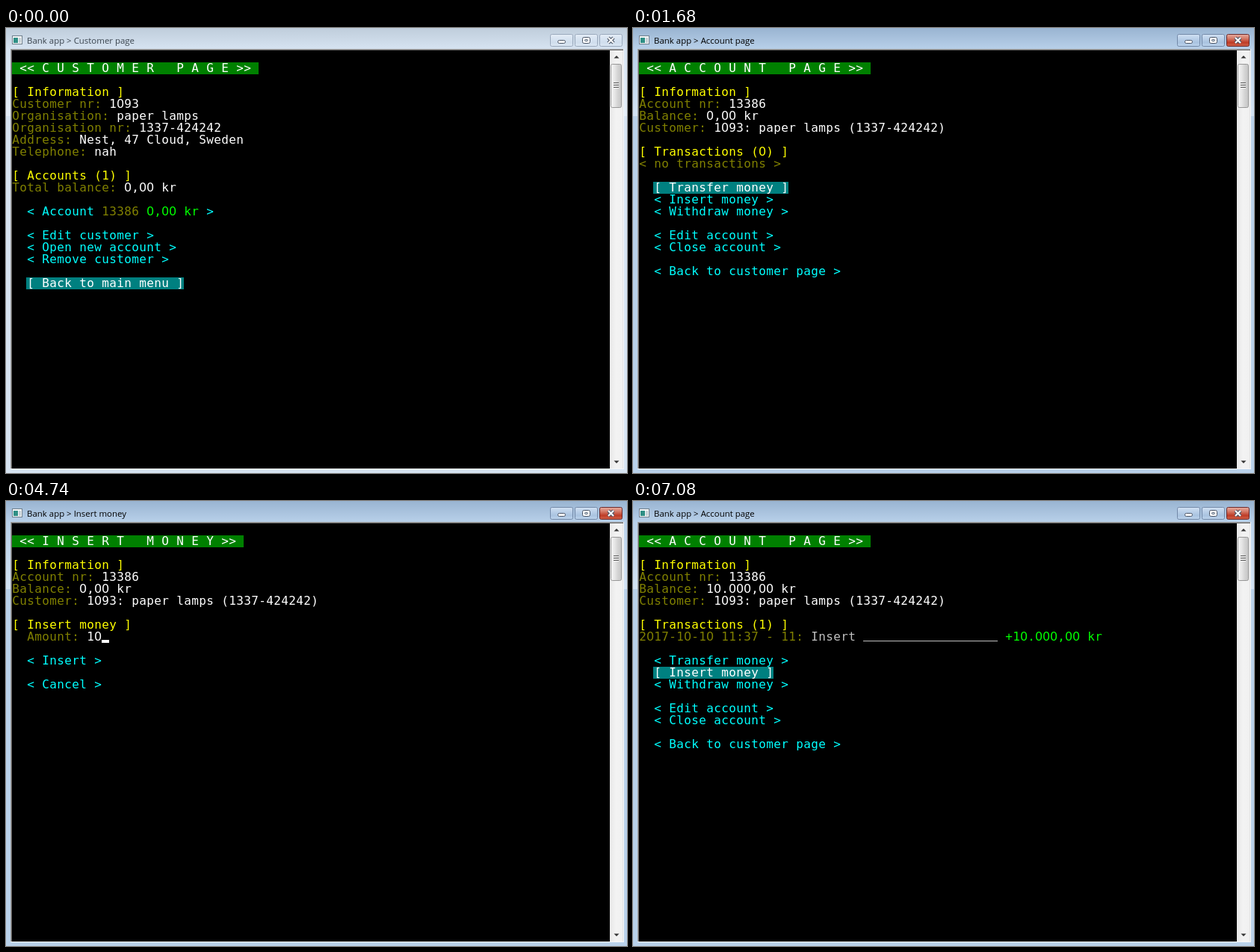
Animation, 831 px wide and 596 px high, one loop 8 s. Source, as an HTML page with a canvas:

```html
<!DOCTYPE html>
<html lang="en">
<head>
<meta charset="utf-8">
<title>Bank app</title>
<style>
html, body { margin: 0; width: 100%; height: 100%; overflow: hidden; }
canvas { display: block; }
</style>
</head>
<body>
<canvas id="stage" width="831" height="596"></canvas>
<script>
const ctx = document.getElementById('stage').getContext('2d');
const LOOP = 8000, CELL = 10, LINE = 16, LEFT = 8, TOP = 30;
const MONO = '16px "DejaVu Sans Mono", monospace';
const SANS = '16px "DejaVu Sans", sans-serif';
const COLORS = {
  w: '#fff', o: '#808000', y: '#ff0', c: '#0ff', l: '#0f0', s: '#c0c0c0', k: '#000'
};
const CUSTOMER = 'paper lamps';

function rect(x, y, w, h, fill) {
  ctx.fillStyle = fill;
  ctx.fillRect(x, y, w, h);
}

function gradient(x0, y0, x1, y1, ...colors) {
  const g = ctx.createLinearGradient(x0, y0, x1, y1);
  colors.forEach((c, i) => g.addColorStop(i / (colors.length - 1), c));
  return g;
}

function roundBox(x, y, w, h, fill, stroke) {
  ctx.beginPath();
  ctx.roundRect(x + .5, y + .5, w - 1, h - 1, 2);
  ctx.fillStyle = fill;
  ctx.fill();
  ctx.strokeStyle = stroke;
  ctx.lineWidth = 1;
  ctx.stroke();
}

// Console text: "^" and a colour key start each run.
function put(row, col, text) {
  const y = TOP + row * LINE + 13;
  ctx.textAlign = 'center';
  for (const run of text.split('^').slice(1)) {
    ctx.fillStyle = COLORS[run[0]];
    for (const ch of run.slice(1)) {
      const x = LEFT + col++ * CELL;
      if (ch === '_') { ctx.fillRect(x, y, CELL, 1); continue; }
      ctx.font = ch === '0' ? SANS : MONO; // plain zero, no dot
      ctx.fillText(ch, x + CELL / 2, y);
    }
  }
}

function heading(words) {
  const text = ' << ' + words.split('').join(' ') + ' >> ';
  rect(LEFT, TOP + LINE, text.length * CELL, LINE, '#008000');
  put(1, 0, '^w' + text);
}

function item(row, label, selected, plain = '^c' + label, marked = '^w' + label) {
  if (selected) rect(27, TOP + row * LINE, (label.length + 4) * CELL + 1, LINE, '#008080');
  put(row, 2, selected ? `^w[ ${marked}^w ]` : `^c< ${plain}^c >`);
}

function menu(items, selected) {
  for (const [row, label] of items) item(row, label, row === selected);
}

function customerPage(selected) {
  heading('CUSTOMER PAGE');
  put(3, 0, '^y[ Information ]');
  put(4, 0, '^oCustomer nr: ^w1093');
  put(5, 0, '^oOrganisation: ^w' + CUSTOMER);
  put(6, 0, '^oOrganisation nr: ^w1337-424242');
  put(7, 0, '^oAddress: ^wNest, 47 Cloud, Sweden');
  put(8, 0, '^oTelephone: ^wnah');
  put(10, 0, '^y[ Accounts (1) ]');
  put(11, 0, '^oTotal balance: ^w0,00 kr');
  item(13, 'Account 13386 0,00 kr', selected === 13,
    '^cAccount ^o13386 ^l0,00 kr', '^wAccount ^k13386 ^w0,00 kr');
  menu([[15, 'Edit customer'], [16, 'Open new account'],
    [17, 'Remove customer'], [19, 'Back to main menu']], selected);
}

function accountInfo(balance) {
  put(3, 0, '^y[ Information ]');
  put(4, 0, '^oAccount nr: ^w13386');
  put(5, 0, `^oBalance: ^w${balance} kr`);
  put(6, 0, `^oCustomer: ^w1093: ${CUSTOMER} (1337-424242)`);
}

function accountPage(selected, paid) {
  heading('ACCOUNT PAGE');
  accountInfo(paid ? '10.000,00' : '0,00');
  put(8, 0, `^y[ Transactions (${paid ? 1 : 0}) ]`);
  put(9, 0, paid
    ? `^o2017-10-10 11:37 - 11: ^sInsert ${'_'.repeat(18)} ^l+10.000,00 kr`
    : '^o< no transactions >');
  menu([[11, 'Transfer money'], [12, 'Insert money'], [13, 'Withdraw money'],
    [15, 'Edit account'], [16, 'Close account'], [18, 'Back to customer page']], selected);
}

const KEYS = [4320, 4440, 5040, 5280, 5460];
const CURSOR = [[3180, 3720], [4200, 4320], [4740, 5040], [5760, 6000]];

function insertPage(t) {
  const typed = KEYS.filter(k => t >= k).length;
  const left = t >= 6000;
  heading('INSERT MONEY');
  accountInfo('0,00');
  put(8, 0, '^y[ Insert money ]');
  put(9, 2, `^oAmount: ^${left ? 's' : 'w'}${'10000'.slice(0, typed)}`);
  if (CURSOR.some(([a, b]) => t >= a && t < b))
    rect(LEFT + (10 + typed) * CELL, 186, CELL, 4, '#fff');
  menu([[11, 'Insert'], [13, 'Cancel']], left ? 11 : 0);
  if (t >= 6180) {
    put(15, 0, '^l10000 kr was inserted to the account');
    put(17, 0, '^sPress any key to continue...');
  }
}

function buttons(active) {
  const edge = active ? '#7389a8' : '#9aa9bc';
  const face = active
    ? gradient(0, 8, 0, 25, '#d3e2f3', '#bdd2ea', '#a9c3e0', '#bfd6ee')
    : gradient(0, 8, 0, 25, '#e6eef7', '#d9e5f2', '#d0deed', '#dde8f4');
  const red = gradient(0, 8, 0, 25, '#e9b0a4', '#d67e6c', '#be3c26', '#d2664c');
  const ink = '#4a5566';
  roundBox(728, 8, 31, 17, face, edge);
  roundBox(761, 8, 31, 17, face, edge);
  roundBox(794, 8, 31, 17, active ? red : face, active ? '#6b2a2c' : edge);
  roundBox(738, 16, 11, 5, '#fff', ink);
  roundBox(771, 12, 11, 9, '#fff', ink);
  roundBox(774, 15, 5, 3, '#dce8f5', ink);
  for (const [width, color] of [[4.5, ink], [2.2, '#fff']]) {
    ctx.beginPath();
    ctx.moveTo(806, 13); ctx.lineTo(813, 20);
    ctx.moveTo(813, 13); ctx.lineTo(806, 20);
    ctx.lineWidth = width;
    ctx.strokeStyle = color;
    ctx.stroke();
  }
}

function arrow(y, dir) {
  ctx.fillStyle = '#333';
  ctx.beginPath();
  ctx.moveTo(813.5, y - dir * 1.5);
  ctx.lineTo(820.5, y - dir * 1.5);
  ctx.lineTo(817, y + dir * 2);
  ctx.fill();
}

function scrollbar() {
  rect(808, 30, 17, 560, gradient(808, 0, 825, 0, '#e8e8e8', '#f3f3f3', '#f0f0f0'));
  arrow(39, -1);
  arrow(581, 1);
  roundBox(809, 48, 15, 59, gradient(809, 0, 824, 0, '#f6f6f6', '#e8e8e8', '#d2d2d2', '#c4c4c4'), '#979797');
  for (let y = 73; y < 82; y += 3) {
    rect(813, y, 7, 1, '#555');
    rect(813, y + 1, 7, 1, '#f8f8f8');
  }
}

function frame(title, active) {
  const base = active ? '#b9d1ea' : '#d7e4f2';
  rect(0, 0, 831, 596, base);
  rect(0, 0, 831, 29, active
    ? gradient(0, 0, 0, 29, '#99b4d1', '#b9d1ea')
    : gradient(0, 0, 0, 29, '#bfcddb', '#d7e4f2'));
  const side = gradient(0, 29, 0, 118, base, active ? '#d3e3f4' : '#e5eef8');
  rect(0, 29, 6, 89, side);
  rect(826, 29, 5, 89, side);

  rect(8, 10, 14, 12, '#6f7f8c');
  rect(9, 11, 12, 10, '#f4f7f8');
  rect(10, 13, 6, 7, '#2f8f86');
  rect(17, 13, 3, 7, '#c5d0d6');

  ctx.font = '11.45px "Open Sans", sans-serif';
  ctx.textAlign = 'left';
  ctx.fillStyle = active ? '#000' : '#3c4650';
  ctx.fillText('Bank app > ' + title, 28, 21);
  buttons(active);

  rect(6, 28, 821, 563, '#f4f7fa');
  rect(6, 28, 820, 562, '#a0a0a0');
  rect(7, 29, 819, 561, '#696969');
  rect(8, 30, 800, 560, '#000');
  rect(825, 30, 1, 560, '#e3e3e3');
  scrollbar();
}

function draw(now) {
  const t = now % LOOP;
  if (t < 1680) {
    frame('Customer page', t >= 180);
    customerPage(t < 420 ? 19 : t < 600 ? 17 : t < 840 ? 16 : t < 1080 ? 15 : 13);
  } else if (t < 3060 || t >= 7080) {
    frame('Account page', true);
    accountPage(t < 2520 ? 11 : 12, t >= 7080);
  } else {
    frame('Insert money', true);
    insertPage(t);
  }
}

let start;
function tick(now) {
  start ??= now;
  draw(now - start);
  requestAnimationFrame(tick);
}
draw(0);
requestAnimationFrame(tick);
</script>
</body>
</html>
```
